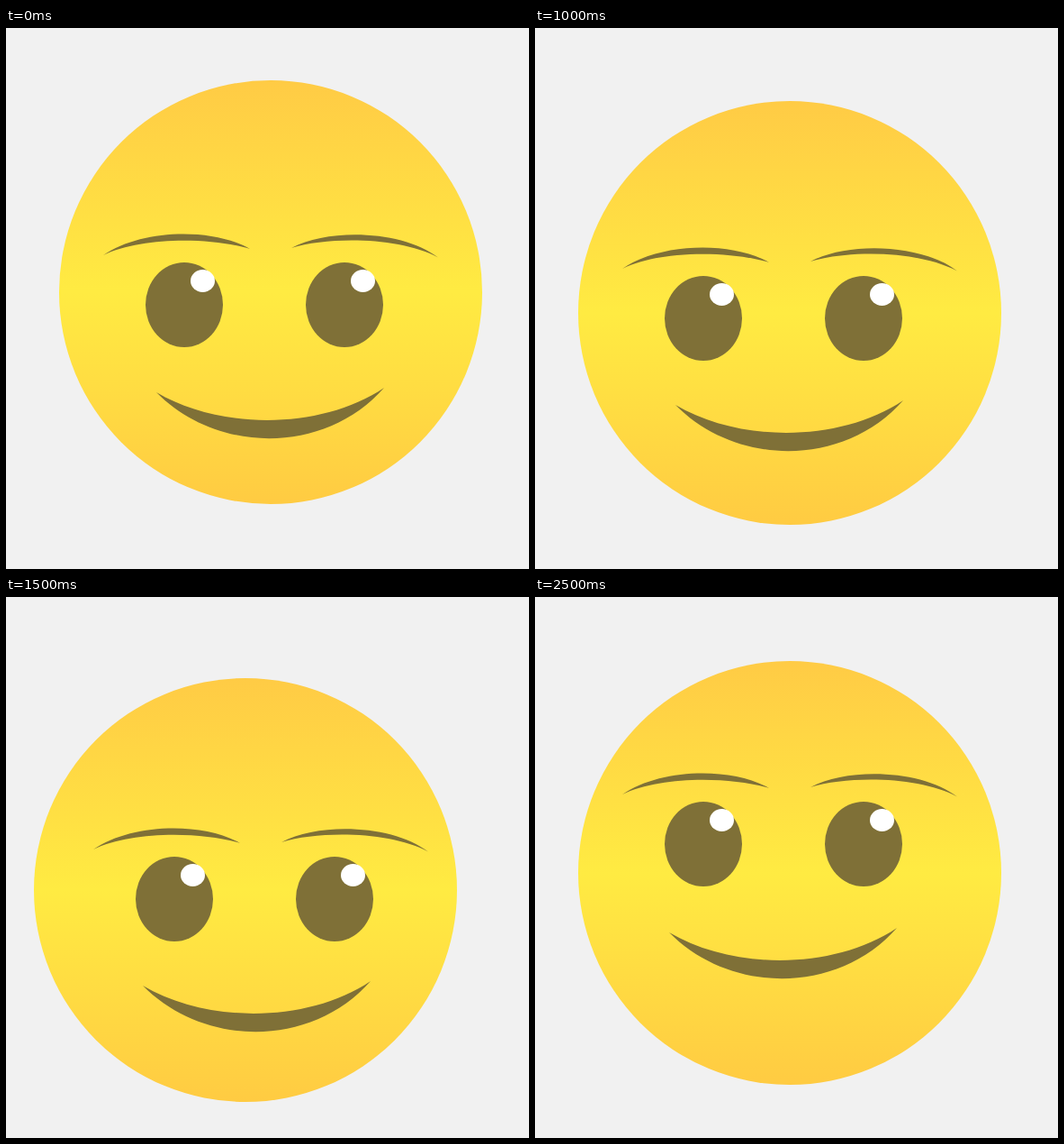
An HTML page that plays this animation: 581x600 px, repeating every 3000 ms.

```html
<!DOCTYPE html>
<html lang="en">
<head>
<meta charset="utf-8">
<title>Smiley</title>
<style>
  html, body { margin: 0; width: 100%; height: 100%; overflow: hidden; background: #f1f1f1; }
  svg { display: block; }
</style>
</head>
<body>
<svg width="581" height="600" viewBox="0 0 581 600">
  <defs>
    <linearGradient id="skin" x1="0" y1="0" x2="0" y2="1">
      <stop offset="0" stop-color="#ffcb45"/>
      <stop offset=".5" stop-color="#ffeb42"/>
      <stop offset="1" stop-color="#ffcb42"/>
    </linearGradient>
    <g id="eye">
      <ellipse rx="43" ry="47" fill="#7f7037"/>
      <ellipse cx="20.5" cy="-26.5" rx="13.5" ry="12.5" fill="#fff"/>
    </g>
  </defs>
  <circle id="face" r="235" fill="url(#skin)"/>
  <g id="eyes" fill="#7f7037">
    <path d="M108 252C150 223 229 221 271 245C229 232 150 231 108 252Z"/>
    <path d="M317 244C360 221 442 225 480 254.500C438 232 360 231 317 244Z"/>
    <use href="#eye" x="198" y="307"/>
    <use href="#eye" x="376" y="307"/>
  </g>
  <path id="mouth" fill="#7f7037"/>
</svg>
<script>
  const SMILE = 'M167 404C235 473 355 473 420 399C350 446 238 446 167 404Z';
  const FLAT = 'M197 436C245 459 307 459 355 436C302 441 250 441 197 436Z';
  const STEP = 500;

  // face centre, eye offset, mouth offset, mouth shape
  const poses = [
    { face: [294, 293], eyes: [0, 0], mouth: [0, 0], shape: SMILE },
    { face: [319, 299], eyes: [-11, 3], mouth: [0, 0], shape: FLAT },
    { face: [283, 316], eyes: [-11, 15], mouth: [-11, 14], shape: SMILE },
    { face: [266, 325], eyes: [-11, 28], mouth: [-15, 27], shape: SMILE },
    { face: [283, 285], eyes: [-11, 4], mouth: [-10, 4], shape: SMILE },
    { face: [283, 306], eyes: [-11, -33], mouth: [-18, -32], shape: SMILE }
  ];

  const parts = ['face', 'eyes', 'mouth'].map(id => document.getElementById(id));
  const mouth = parts[2];
  const start = performance.now();
  let shown = null;

  function draw(now) {
    const elapsed = Math.max(0, now - start);
    const pose = poses[Math.floor(elapsed / STEP) % poses.length];
    if (pose !== shown) {
      for (const part of parts) part.setAttribute('transform', `translate(${pose[part.id]})`);
      mouth.setAttribute('d', pose.shape);
      shown = pose;
    }
    requestAnimationFrame(draw);
  }
  draw(start);
</script>
</body>
</html>
```
